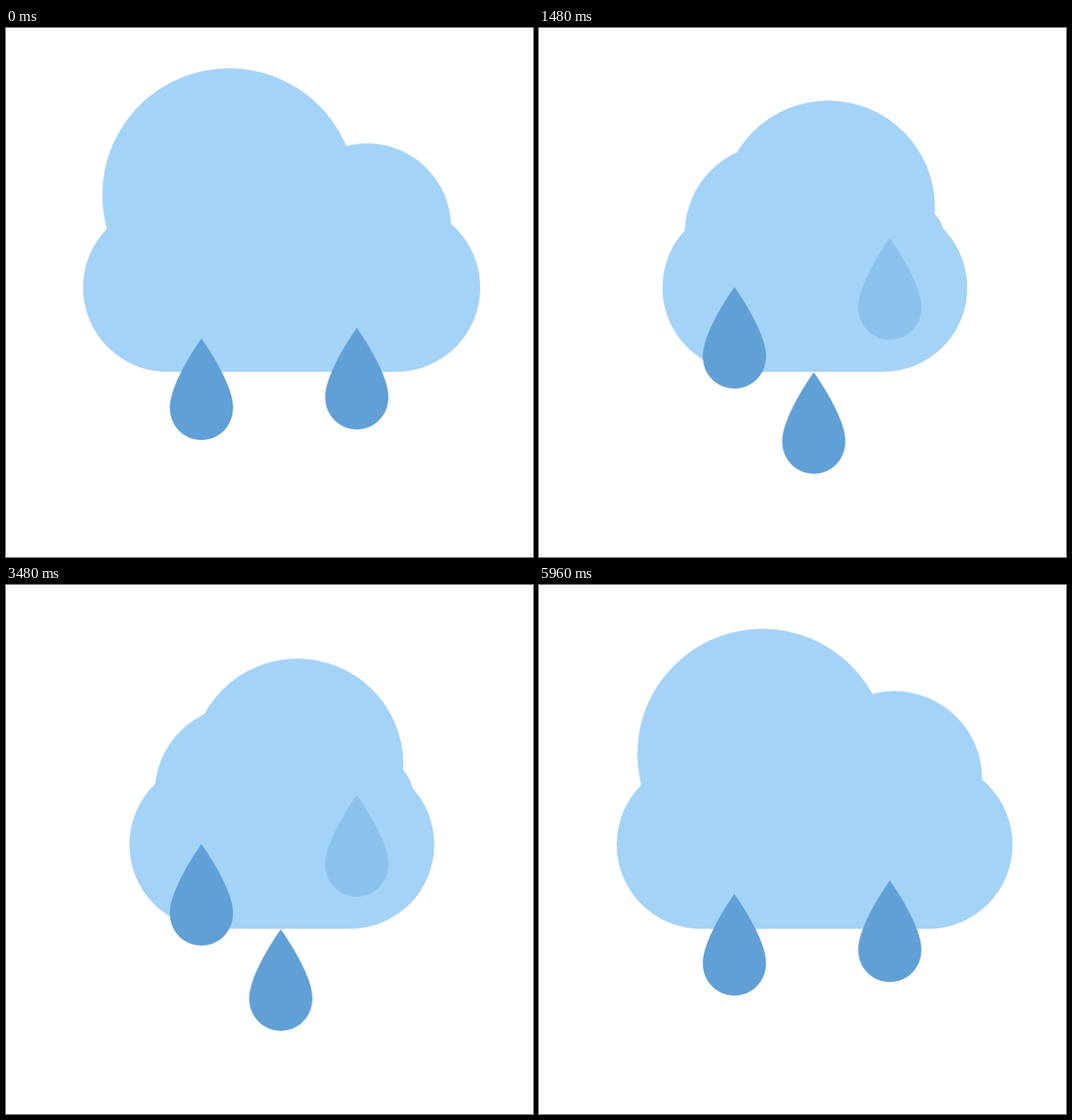
An HTML page without scripts for the animation above (6000 ms loop, 747 by 750 pixels).

```html
<!DOCTYPE html>
<html lang="en">
<head>
<meta charset="utf-8">
<title>Rain cloud</title>
<style>
  html, body { margin: 0; width: 100%; height: 100%; overflow: hidden; background: #fff; }
  svg { display: block; width: 747px; height: 750px; }

  .cloud { fill: #a3d3f7; }
  .base { animation: squeeze .5s cubic-bezier(.37, 0, .63, 1) infinite alternate; }
  @keyframes squeeze {
    from { x: 109.2px; width: 563px; }
    to { x: 175.2px; width: 431.6px; }
  }

  /* Each puff swells on the left, drifts right and sinks back into the base. */
  .puff { animation: roll 6s linear var(--at) infinite; }
  @keyframes roll {
    0% { transform: translate(352px, 368px) scale(0); }
    3.333% { transform: translate(349px, 345px) scale(.72); }
    11.333% { transform: translate(332px, 289px) scale(1.28); }
    18.333% { transform: translate(318px, 243.5px) scale(1.735); }
    20% { transform: translate(316.2px, 237px) scale(1.8); }
    28% { transform: translate(413.5px, 254.5px) scale(1.5); }
    35.583% { transform: translate(503.5px, 274.5px) scale(1.245); }
    36.25% { transform: translate(511.8px, 282.6px) scale(1.192); }
    44.5% { transform: translate(518.5px, 301.5px) scale(.585); }
    53.333%, 100% { transform: translate(520px, 320px) scale(0); }
  }

  .drop {
    fill: #60a0d6;
    animation: fall 1s var(--at) infinite, fade 1s linear var(--at) infinite;
  }
  .late { animation-name: fall, fade-late; }
  @keyframes fall {
    0% { transform: translateY(-171.2px); animation-timing-function: cubic-bezier(.333, .667, .667, 1); }
    97%, 100% { transform: translateY(0); }
  }
  @keyframes fade {
    0%, 96%, 100% { opacity: 0; }
    11%, 89% { opacity: 1; }
  }
  @keyframes fade-late {
    0%, 6%, 96%, 100% { opacity: 0; }
    15%, 89% { opacity: 1; }
  }
</style>
</head>
<body>
<svg viewBox="0 0 747 750">
  <defs>
    <path id="tear" d="M0-144C0-144 44.8-82 44.8-46C44.8-20 25 0 0 0S-44.8-20-44.8-46C-44.8-82 0-144 0-144Z"/>
  </defs>
  <g class="cloud">
    <rect class="base" x="109.2" y="248.5" width="563" height="239" rx="119.5"/>
    <circle class="puff" r="100" style="--at:-7.2s"/>
    <circle class="puff" r="100" style="--at:-6.182s"/>
    <circle class="puff" r="100" style="--at:-5.182s"/>
    <circle class="puff" r="100" style="--at:-4.197s"/>
    <circle class="puff" r="100" style="--at:-3.154s"/>
    <circle class="puff" r="100" style="--at:-2.175s"/>
  </g>
  <g transform="translate(277 587)"><use class="drop" href="#tear" style="--at:-.8435s"/></g>
  <g transform="translate(389.5 667)"><use class="drop late" href="#tear" style="--at:-.05s"/></g>
  <g transform="translate(497.2 600.2)"><use class="drop" href="#tear" style="--at:-.556s"/></g>
</svg>
</body>
</html>
```
